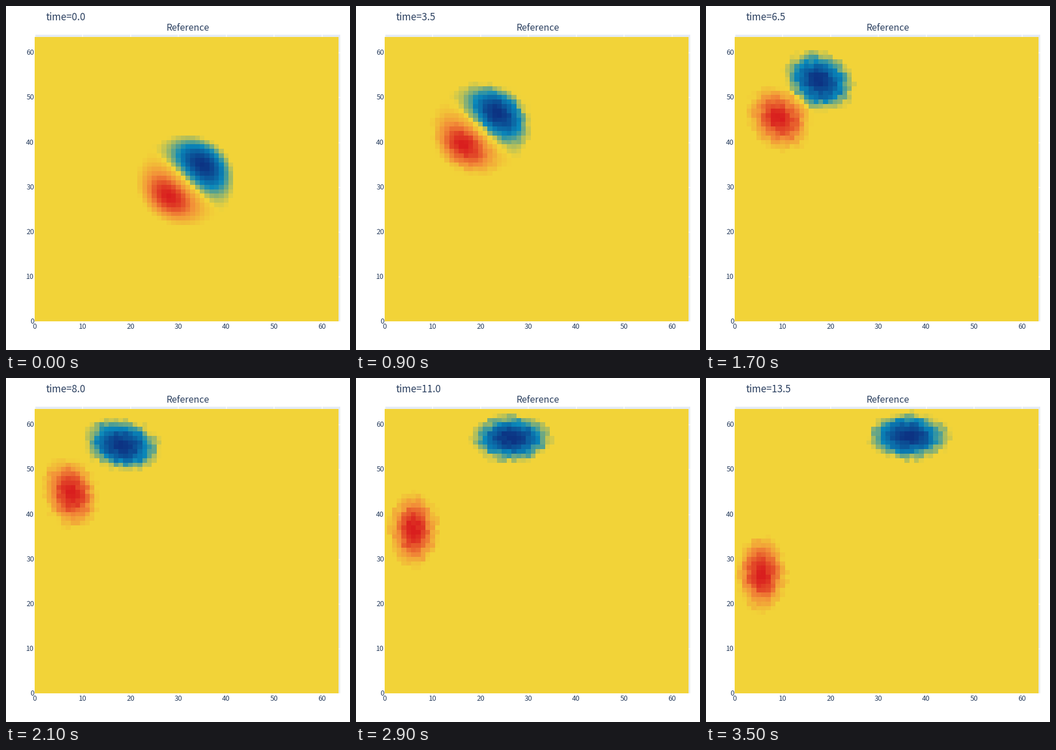
Recreate the animation shown at these times as a matplotlib script. Size 600 px wide and 600 px high, loop 3600 ms.

```python
import numpy as np
import matplotlib.pyplot as plt
from matplotlib.animation import FuncAnimation
from matplotlib.colors import LinearSegmentedColormap
from matplotlib.patches import Rectangle

SIZE, DPI, N = 600, 100, 64
LEFT, TOP, RIGHT, BOTTOM = 50, 50, 583, 550
SX, SY = 530 / (N - 0.5), (BOTTOM - TOP) / N
INK = "#2a3f5f"
PX = 72 / DPI  # points per pixel
PORTLAND = ["#0c3383", "#0a88ba", "#f2d338", "#f28f38", "#d91e1e"]
RADIUS, OFFSET = 10.3, 3.5
GY, GX = np.mgrid[0:N, 0:N].astype(float)


def ease(t, start, end):
    s = np.clip((t - start) / (end - start), 0, 1)
    return s * s * (3 - 2 * s)


def mix(a, b, w):
    return a + (b - a) * w


def turn(t, when):
    """Ramp that starts softly around the given time."""
    return 1.5 * np.log1p(np.exp((t - when) / 1.5))


def position(t):
    """Drift diagonally to the corner, then turn along the top wall."""
    return 35 - 3.5 * t + 7.75 * turn(t, 7.25), 35 + 3.5 * t - 3.4 * turn(t, 6.2)


def bessel_j1(x):
    tau = (np.arange(48) + 0.5) * np.pi / 48
    return np.cos(tau - x[..., None] * np.sin(tau)).mean(axis=-1)


def lamb_lobe(dx, dy):
    """Positive half of a Lamb dipole, relative to the lobe's peak."""
    x, y = dx + OFFSET, dy + OFFSET
    r = np.hypot(x, y) + 1e-9
    lobe = bessel_j1(3.8317 * r / RADIUS) / 0.5819 * (x + y) / (r * np.sqrt(2))
    return np.where(r < RADIUS, np.clip(lobe, 0, 1), 0)


def ellipse(dx, dy, t):
    w = ease(t, 5, 10)
    a, b = mix(7.8, 8.9, w), mix(6.6, 5.6, w)
    angle = mix(-np.pi / 4, 0, w)
    u = dx * np.cos(angle) + dy * np.sin(angle)
    v = dy * np.cos(angle) - dx * np.sin(angle)
    return np.clip(1 - (u / a)**2 - (v / b)**2, 0, 1)**1.4


def vorticity(k):
    t = k / 2
    rng = np.random.default_rng(100 + k)
    jitter = rng.uniform(-1, 1, (2, N, N)) * min(0.08 * t, 0.5)
    px, py = position(t)
    dx, dy = GX - px + jitter[0], GY - py + jitter[1]
    blue = mix(lamb_lobe(dx, dy), ellipse(dx, dy, t), ease(t, 3, 6.5))
    blue /= blue.max()
    return blue.T[::-1, ::-1] - blue  # red mirrors blue across the anti-diagonal


fig = plt.figure(figsize=(SIZE / DPI, SIZE / DPI), dpi=DPI, facecolor="white")
ax = fig.add_axes([0, 0, 1, 1])
ax.axis("off")


def label(x, y, text, size, ha):
    return ax.text(x, y, text, size=size * PX, ha=ha, va="baseline",
                   color=INK, family="Noto Sans CJK JP")


ax.add_patch(Rectangle((LEFT, TOP), RIGHT - LEFT, BOTTOM - TOP,
                       fc="#e5ecf6", lw=0, zorder=0))
for v in range(0, 61, 10):
    x, y = LEFT + v * SX, BOTTOM - v * SY
    ax.plot([x, x], [TOP, BOTTOM], color="white", lw=1.4 * PX, zorder=1)
    ax.plot([LEFT, RIGHT], [y, y], color="white", lw=1.4 * PX, zorder=1)
    label(x, 563, str(v), 12.4, "center")
    label(49, y + 4, str(v), 12.4, "right")
label((LEFT + RIGHT) / 2, 43, "Reference", 16, "center")
clock = label(70, 25, "", 17, "left")

edges = np.clip(np.arange(N + 1) - 0.5, 0, N - 0.5)
cmap = LinearSegmentedColormap.from_list("portland", PORTLAND, N=512)
mesh = ax.pcolormesh(np.round(LEFT + edges * SX), np.round(BOTTOM - edges * SY),
                     np.zeros((N, N)), cmap=cmap, vmin=-1, vmax=1,
                     antialiased=False, zorder=2)
ax.set_xlim(0, SIZE)
ax.set_ylim(SIZE, 0)


def update(n):
    k = n - n // 4  # every fourth tick holds the picture
    mesh.set_array(vorticity(k))
    clock.set_text(f"time={k / 2:.1f}")
    return mesh, clock


anim = FuncAnimation(fig, update, frames=36, interval=100, repeat=True,
                     repeat_delay=0, blit=False)
plt.show()
```
